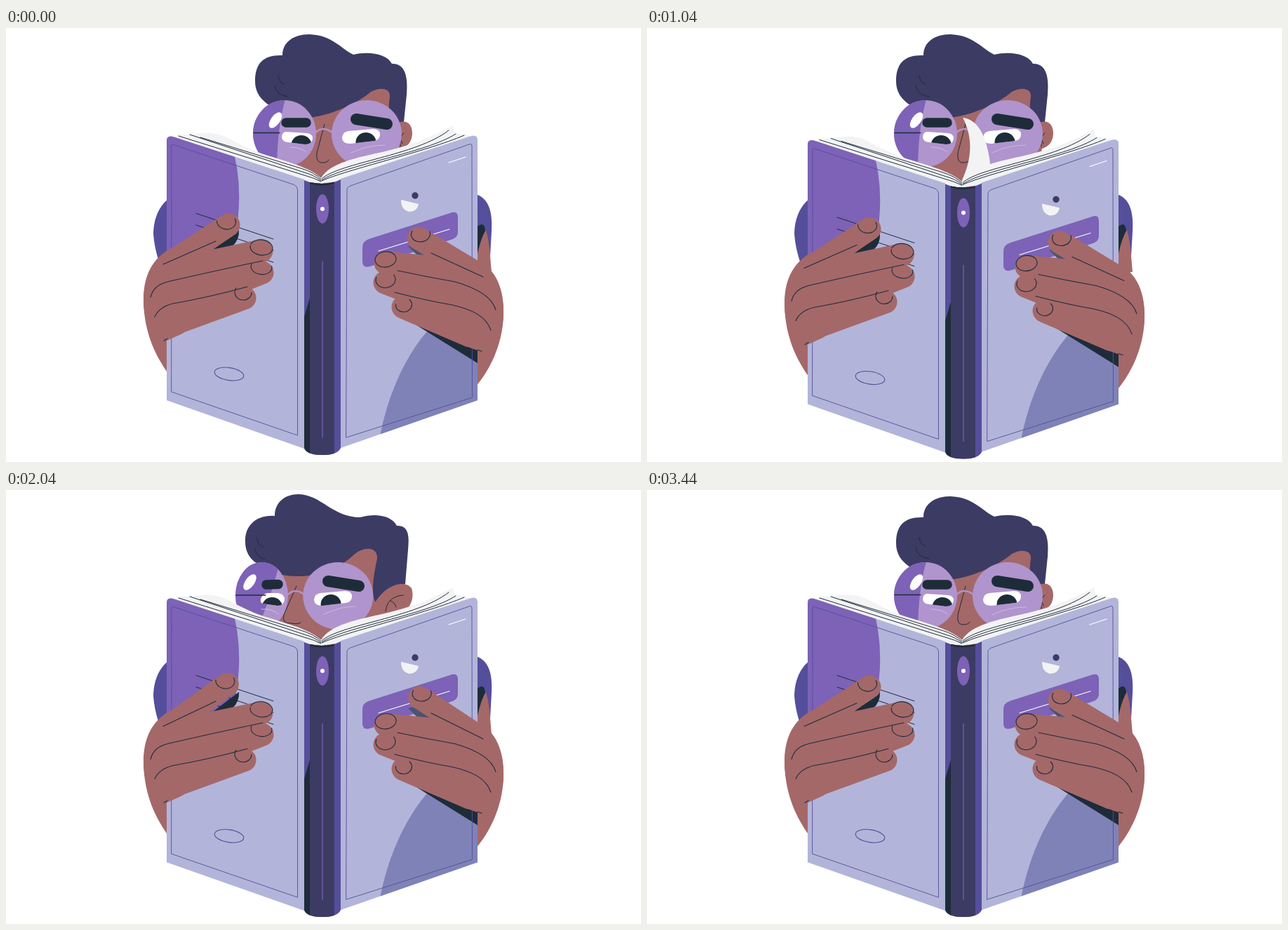
Recreate the animation shown at these times as an HTML page with a canvas. Size 905x619 px, loop 3.48 s.

```html
<!DOCTYPE html>
<html lang="en">
<head>
<meta charset="utf-8">
<title>Reader</title>
<style>
html, body { margin: 0; width: 100%; height: 100%; overflow: hidden; background: #fff; }
canvas { display: block; }
</style>
</head>
<body>
<canvas id="stage" width="905" height="619"></canvas>
<script>
const ctx = document.getElementById('stage').getContext('2d');
const LOOP = 3480;
const HAIR = '#3c3b64', SKIN = '#a46869', DARK = '#1e2c3a', COVER = '#b2b5d9', SHADE = '#7f82b7';
const PURPLE = '#7d62b7', SHIRT = '#554e9b', LENS = '#b094cd', PAPER = '#f3f3f4';

const mix = (a, b, k) => a + (b - a) * k;
const clamp = v => Math.max(0, Math.min(1, v));
const ease = u => u < .5 ? 4 * u ** 3 : 1 - 4 * (1 - u) ** 3;
const ramp = (t, from, to) => ease(clamp((t - from) / (to - from)));
const pulse = (t, peak, span) =>
  Math.abs(t - peak) < span / 2 ? Math.cos(Math.PI * (t - peak) / span) ** 2 : 0;

// Blends two path strings that share the same commands.
function morph(a, b, k) {
  const ends = b.match(/-?[\d.]+/g);
  let i = 0;
  return a.replace(/-?[\d.]+/g, n => mix(+n, +ends[i++], k).toFixed(2));
}

function between(keys, t) {
  let i = 1;
  while (i < keys.length - 1 && t > keys[i][0]) i++;
  const [t0, a] = keys[i - 1], [t1, b] = keys[i];
  const k = clamp((t - t0) / (t1 - t0));
  return typeof a === 'string' ? morph(a, b, k) : mix(a, b, k);
}

function fill(path, color) {
  ctx.fillStyle = color;
  ctx.fill(new Path2D(path));
}

function line(path, color = DARK, width = 1) {
  ctx.strokeStyle = color;
  ctx.lineWidth = width;
  ctx.stroke(new Path2D(path));
}

function oval(x, y, rx, ry, color, turn = 0) {
  ctx.beginPath();
  ctx.ellipse(x, y, rx, ry, turn, 0, 7);
  ctx.fillStyle = color;
  ctx.fill();
}

function arc(x, y, rx, ry, turn, from, to, color) {
  ctx.beginPath();
  ctx.ellipse(x, y, rx, ry, turn, from, to);
  ctx.strokeStyle = color;
  ctx.lineWidth = 1.1;
  ctx.stroke();
}

// Outline around two circles of different size.
function taper(x0, y0, r0, x1, y1, r1, color) {
  const along = Math.atan2(y1 - y0, x1 - x0);
  const side = Math.acos((r0 - r1) / Math.hypot(x1 - x0, y1 - y0));
  ctx.beginPath();
  ctx.arc(x1, y1, r1, along - side, along + side);
  ctx.arc(x0, y0, r0, along + side, along - side + 2 * Math.PI);
  ctx.fillStyle = color;
  ctx.fill();
}

function group(draw, clip, matrix) {
  ctx.save();
  if (matrix) ctx.transform(...matrix);
  if (clip) ctx.clip(new Path2D(clip));
  draw();
  ctx.restore();
}

function drawShoulders() {
  fill('M258 234C226 236 210 264 210 294C212 320 220 338 226 358L278 545L310 544L340 234Z', SHIRT);
  fill('M660 236C688 236 694 262 692 290L690 326L660 326Z', SHIRT);
  fill('M665 290Q682 270 683 290L676 330L665 330Z', DARK);
  fill('M665 340L672 322C676 304 680 294 684 288C689 304 690 325 692 348L665 348Z', SKIN);
}

const GAZE = [[0, 0], [260, -18], [440, -16], [1040, -3], [1400, -14],
              [1760, -12.5], [2400, -5.5], [3000, 0], [LOOP, 0]];

function drawEye(white, x, y) {
  fill(white, '#fff');
  group(() => oval(x, y, 14.5, 14, DARK), white);
}

function drawHead(t, k) {
  const pose = (a, b) => morph(a, b, k);
  const gaze = between(GAZE, t);

  fill(pose('M385 108L515 80L550 80L566 140L560 200L450 230L395 190Z',
            'M365 105L490 78L532 80L550 150L560 195L450 230L365 190Z'), SKIN);
  fill(pose(
    'M378 112C362 102 355 91 355 76C355 50 367 38 394 39C394 20 410 9 432 9C465 10 478 30 495 38C516 33 542 36 550 51C570 50 573 72 571 95L567 134L552 136C547 128 544 116 547 98C548 85 533 84 520 91C500 108 460 126 430 128C405 128 390 120 378 112Z',
    'M365 108C348 102 341 88 341 74C340 50 358 35 383 37C383 18 397 6 417 6C450 7 465 39 505 39C526 33 549 36 557 51C574 50 575 66 573 85L569 134L527 160C520 150 523 125 529 98C530 80 510 80 496 92C480 108 450 122 420 123C395 124 380 118 365 108Z'), HAIR);
  line(pose('M388 68Q389 78 397 80M383 82Q385 96 402 98', 'M358 69Q358 78 367 82M354 83Q357 96 369 99'));
  fill(pose('M555 137C572 128 579 138 579 151C578 165 570 172 555 174Z',
            'M525 162C540 135 568 127 578 140C582 154 579 166 555 190Z'), SKIN);
  line(pose('M562 169Q561 152 567 150M561 158Q564 160 565 165',
            'M541 173C541 160 552 151 566 150M548 158Q554 160 556 167'
              .replace('C541 160 552 151 566 150', 'Q543 152 566 150')));

  line(pose('M454 137L443 178Q441 194 453 192Q459 191 460 188', 'M414 137L396 178Q393 191 406 190Q417 192 420 189'));
  line(pose('M440 150Q452 138 466 150', 'M401 150Q412 138 426 150'), LENS, 2.5);

  const leftX = mix(397, 364.5, k), leftR = mix(45, 37.5, k);
  oval(leftX, 150.5, leftR, 47.5, LENS);
  group(() => {
    ctx.beginPath();
    ctx.ellipse(leftX, 150.5, leftR, 47.5, 0, 0, 7);
    ctx.clip();
    fill(pose('M340 95L400 95Q386 140 386 205L340 205Z', 'M315 95L392 95Q382 140 356 205L315 205Z'), PURPLE);
    drawEye(pose('M399 148L428 150Q437 150 437 158Q436 166 426 166L402 163Q393 162 393 155Q394 148 399 148Z',
                 'M373 147L388 147Q397 149 397 156Q396 165 387 165L366 162Q362 161 363 155Q367 147 373 147Z'),
            mix(421, 385, k) + gaze * .6, 167);
    line(pose('M353 149.5L390 149.5', 'M327 150L370 150'), DARK, 1.3);
    line(pose('M405 170Q420 170 428 177', 'M364 170Q380 169 388 177'), '#cfb9e0');
  });
  oval(mix(384, 347.5, k), 131.5, 6.5, 13, '#fff', .62);
  line(pose('M399 135L428 135', 'M371 135L388 134.5'), DARK, 13.5);

  oval(mix(514, 473.3, k), 151, 50, 48, LENS);
  drawEye(pose('M488 147L523 144Q533 144 533 152Q533 159 525 161L491 165Q479 165 479 156Q480 148 488 147Z',
               'M448 147L483 144Q493 144 493 152Q493 159 485 161L451 165Q439 165 439 156Q440 148 448 147Z'),
          mix(513, 472.5, k) + gaze, 163);
  line(pose('M492 178Q515 167 540 167', 'M452 178Q475 166 498 166'), '#cfb9e0');
  line(pose('M499 130L543 137', 'M459 130L503 137'), DARK, 16);
}

const PAGE = [
  [200, 'M449 217C430 198 340 166 290 152Q292 170 310 190L449 225Z'],
  [440, 'M455 208C448 200 418 158 369 136Q374 160 390 205L449 225Z'],
  [1040, 'M449 217C464 185 464 155 450 128Q486 132 491 215L449 225Z'],
  [1440, 'M449 217C460 178 512 205 502 134Q532 142 527 215L449 225Z'],
  [1760, 'M449 217C478 172 545 190 577 142Q592 147 612 185L449 225Z'],
  [2000, 'M449 217C470 182 585 182 634 144Q638 148 642 170L449 225Z']
];

function drawLeftCover(swing) {
  // The outer part of the cover slides inwards while the spine side stays put.
  const dx = 26 * swing, dy = -7 * swing;
  const slide = path => path.replace(/([\d.]+) ([\d.]+)/g,
    (pair, x, y) => x < 350 ? `${+x + dx} ${+y + dy}` : pair);

  fill(slide('M240 157L247 152L262 152L277 150C312 146 316 162 370 181C412 194 436 201 449 214L449 222L425 219Z'), PAPER);
  line(slide('M246 154L425 210Q440 214 449 219M262 152L425 206Q440 210 449 218M277 156L420 200Q440 206 449 216'));
  const board = slide('M425 216L238 155Q229 153 229 161L229 531L425 600Z');
  fill(board, COVER);
  group(() => fill(slide('M220 140L320 160Q341 228 326 300L229 350Z'), PURPLE), board);
  line(slide('M236 168Q236 165 240 167L409 223Q415 225 415.5 231L415.5 581L236 519Z'), SHIRT, .9);
  for (let i = 0; i < 4; i++) line(slide(`M271 ${264.5 + i * 16.6}L381 ${301 + i * 16.6}`));
  arc(318 + dx, 493.5 + dy, 21, 9, .15 + .13 * swing, 0, 7, SHIRT);
}

function drawRightCover() {
  fill('M449 214C462 192 500 185 540 176C590 164 612 152 637 139L639 149L654 152L666 156L477 218L449 222Z', PAPER);
  line('M450 215C475 192 585 182 631 146M450 217C480 196 600 178 641 151M450 218C485 202 600 176 653 153');
  const board = 'M477 215L663 154Q672 152 672 160L672 531L477 599Z';
  fill(board, COVER);
  group(() => {
    fill('M533 582C543 530 565 472 604 428L680 440L680 540Z', SHADE);
    fill('M566 412L672 478L672 430Z', DARK);
  }, board);
  line('M486 231Q486 227 491 225L660 166Q664 164 664 169L664.5 527L485 584Z', SHIRT, .9);
  line('M631 192L655 184', '#fff', 1.2);
  oval(583, 239, 4.7, 4.7, HAIR);
  fill('M563 245L588 251Q586 262 574 262Q563 259 563 245Z', PAPER);
  fill('M517 301L636 263Q644 261 644 270L644 291Q644 298 637 301L519 340Q508 343 508 333L508 313Q508 304 517 301Z', PURPLE);
  line('M531 318L632 287', '#fff', 1.2);
  fill('M573 311L588 326L616 326L592 308Z', '#4b5373');
}

function drawSpine() {
  const body = 'M425 217L433 220Q450 224 468 220L477 216L477 599Q473 609 451 609Q428 609 425 599Z';
  fill(body, SHIRT);
  group(() => {
    fill('M425 412L433 385L433 612L425 612Z', DARK);
    fill('M433 215L468 215L468 612L433 612Z', HAIR);
    fill('M433 215L468 215L468 222Q450 227 433 222Z', DARK);
  }, body);
  oval(451, 258, 9, 21, PURPLE);
  oval(451, 258, 3, 3, '#fff');
  line('M451 333L451 584', PURPLE, 1.2);
}

// Index to little finger: base circle, tip centre, nail ellipse and its arc.
const LEFT = {
  side: -1,
  fingers: [
    [240, 332, 17, 317, 281, 314, 276, 13.5, 11, -.55, 3.1],
    [250, 352, 26, 364, 318, 364, 313, 16, 11, -2.9, 3.2],
    [235, 390, 26, 365, 349, 364, 341, 15, 10.5, -.3, 3.4],
    [245, 418, 18, 340, 385, 338, 377, 12, 11, -.1, 3.6]
  ],
  reach: [-2, 5, 6, -3],
  palm: 'M232 316C205 332 196 358 196 388C196 415 205 436 216 462L229 446L251 436L300 400L290 330Z',
  creases: [
    ['M224 337L', 299, 304],
    ['M206 384Q210 367 230 362Q290 348', 366, 332],
    ['M212 412Q218 398 238 393Q290 384', 344, 369]
  ]
};
const RIGHT = {
  side: 1,
  fingers: [
    [675, 352, 16, 588, 300, 591, 294, 13.5, 11, -.2, 3.7],
    [655, 360, 30, 541, 335, 541, 330, 15, 11, -.3, 5.9],
    [660, 400, 26, 540, 363, 541, 359, 14, 11.5, -.5, 3.6],
    [660, 438, 17, 566, 398, 567, 395, 11.5, 10, -.7, 3.4]
  ],
  reach: [0, 0, 0, 0],
  palm: 'M674 331C704 350 710 380 709 412C706 440 698 458 690 476L678 462L653 453L610 400L645 345Z',
  creases: [
    ['M680 355L', 606, 321],
    ['M698 402C692 382 668 370 640 362Q600 355', 558, 346],
    ['M691 431C684 410 662 401 636 395Q600 389', 554, 377]
  ]
};
const LIFT_PEAKS = [1800, 1685, 1600, 1530];
const LIFT_HEIGHTS = [13, 23, 23, 19];

function drawFingers(t, { side, fingers, reach, palm, creases }, swing) {
  const moves = fingers.map((finger, i) => {
    const lift = LIFT_HEIGHTS[i] * pulse(t, LIFT_PEAKS[i], 755);
    return { x: side * lift * .45 + reach[i] * swing, y: -lift };
  });
  fill(palm, SKIN);
  fingers.forEach(([bx, by, br, tx, ty], i) =>
    taper(bx, by, br, tx + moves[i].x, ty + moves[i].y, 16.5, SKIN));
  fingers.forEach(([, , , , , x, y, rx, ry, from, to], i) =>
    arc(x + moves[i].x, y + moves[i].y, rx, ry, -side * .12, from, to, DARK));
  creases.forEach(([start, x, y], i) =>
    line(`${start} ${x} ${y + moves[i && i + 1].y * .75}`, DARK, 1.1));
}

function draw(t) {
  const bob = t < 2000 ? 2.75 * (1 - Math.cos(Math.PI * t / 1000)) : 0;
  const swing = pulse(t, 500, 1000) * 1.03;
  const turn = ramp(t, 1100, 1600) - ramp(t, 2600, 3100);
  const handMatrix = [1 - .08 * swing, -.135 * swing, -.02 * swing, 1, 49.8 * swing, 29 * swing];

  ctx.setTransform(1, 0, 0, 1, 0, 0);
  ctx.fillStyle = '#fff';
  ctx.fillRect(0, 0, 905, 619);
  ctx.lineCap = 'round';
  ctx.lineJoin = 'round';

  drawShoulders();
  drawHead(t, turn);
  if (t > 200 && t < 2000) fill(between(PAGE, t), PAPER);

  ctx.translate(0, bob);
  group(() => fill('M240 335C205 335 196 365 196 390C197 435 213 468 232 494L260 480L260 340Z', SKIN), null, handMatrix);
  fill('M665 330C704 350 710 380 709 412C707 452 690 488 668 513Z', SKIN);
  drawLeftCover(swing);
  drawRightCover();
  drawSpine();
  group(() => {
    fill('M290 320L332 288Q333 302 322 312Z', DARK);
    drawFingers(t, LEFT, swing);
    line('M225 446L230 443', DARK, 1.1);
  }, null, handMatrix);
  drawFingers(t, RIGHT, swing);
  line('M672 459L678 461', DARK, 1.1);
}

const began = performance.now();
function tick() {
  draw((performance.now() - began) % LOOP);
  requestAnimationFrame(tick);
}
tick();
</script>
</body>
</html>
```
